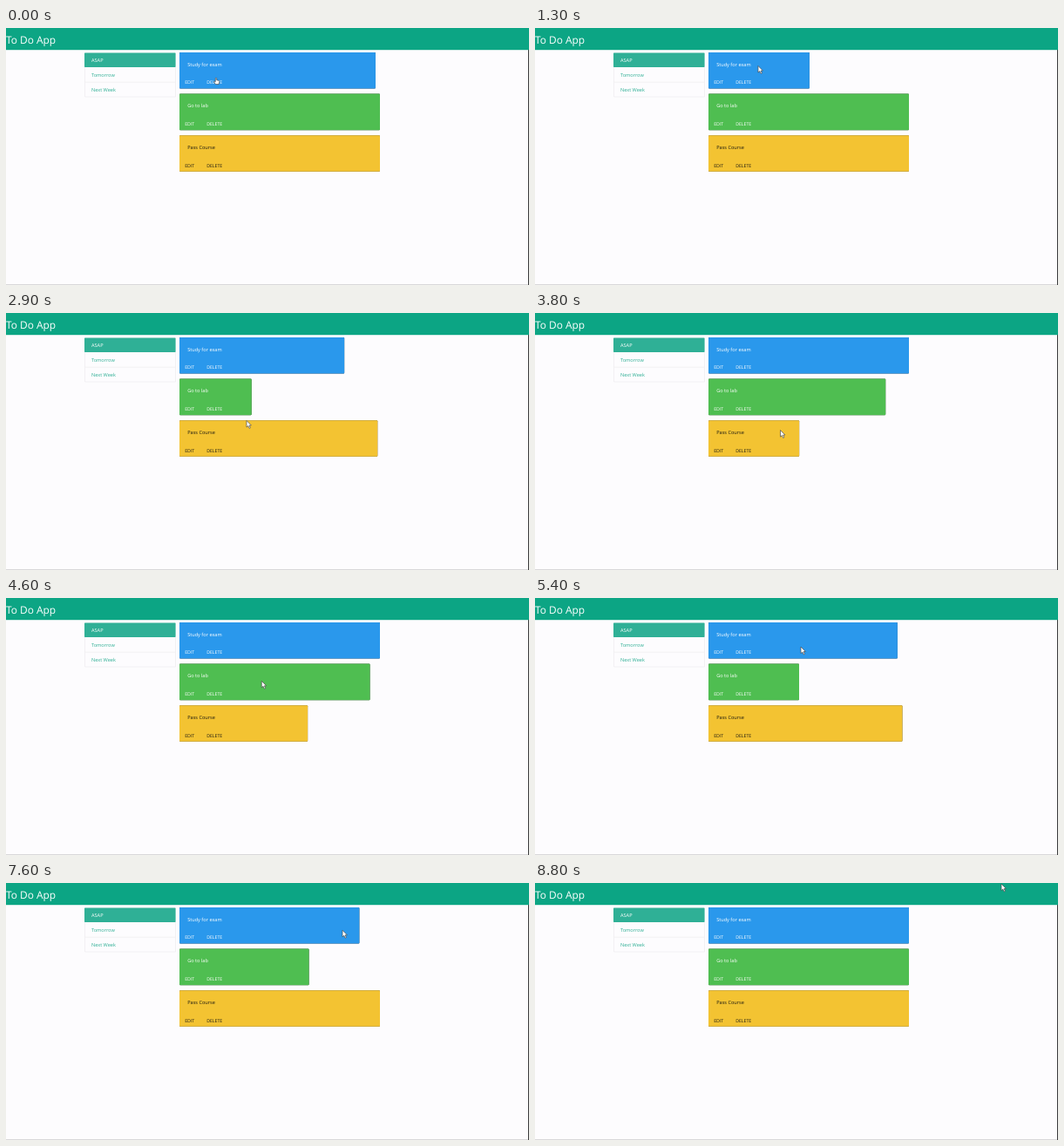
Animation of 600x295 px, one loop 8900 ms. Source, as an HTML page:

```html
<!DOCTYPE html>
<html lang="en">
<head>
<meta charset="utf-8">
<title>To Do App</title>
<style>
  html, body { margin: 0; width: 100%; height: 100%; overflow: hidden; background: #fdfcfe; }
  svg { display: block; width: 600px; height: 295px; }
  text { font-family: "Open Sans", "Noto Sans", sans-serif; font-size: 5.6px; text-rendering: geometricPrecision; }
  .title { font-size: 11.9px; fill: #fff; }
  .action { font-size: 5.2px; }
  .card rect { filter: drop-shadow(0 .3px .7px rgba(0, 0, 0, .75)); }
  .light { fill: #fff; }
  .dark { fill: #1d1a12; }
  .link { fill: #2fb096; }
  .line { fill: none; stroke: #ecebee; stroke-width: .7; }
  .cursor { fill: #fff; stroke: #444; stroke-width: .65; stroke-linejoin: round; }
</style>
</head>
<body>
<svg viewBox="0 0 600 295">
  <path d="M0 294.5H599" stroke="#d9d8da"/>
  <path d="M599.5 25V295" stroke="#3b3b3d"/>
  <rect width="600" height="25.2" fill="#0ca584"/>
  <text class="title" x="0" y="17.6">To Do App</text>

  <path class="line" d="M90.5 45V79H194.5V45M90.5 62.2H194.5"/>
  <rect x="90" y="28.5" width="104.6" height="16.4" rx=".6" fill="#2fb096"/>
  <text class="light" x="98" y="38.8">ASAP</text>
  <text class="link" x="98" y="55.8">Tomorrow</text>
  <text class="link" x="98" y="73">Next Week</text>

  <g id="cards"></g>

  <path id="arrow" class="cursor" d="M0 0V7.6L1.8 6L3.1 8.9L4.4 8.3L3.1 5.5H5.4Z"/>
  <path id="hand" class="cursor" d="M-.7 .5Q0-.5 .7 .5V2.8L3.4 3.5Q4 3.8 3.8 4.6L3.1 7.6H-.6L-2.4 4.9Q-2.4 3.9-1.5 4.2L-.7 4.9Z"/>
</svg>
<script>
const LOOP = 8900, STEP = 100;
const LEFT = 199, FULL = 429, TOP = 28, PITCH = 47.6;

// A hovered card shrinks from `enter` to `leave`, down to the pointer, then regrows until `done`.
const cards = [
  { label: "Study for exam", fill: "#2a98ec", tone: "light", hovers: [
    { enter: -60, leave: 1800, stop: 273, done: 3290 },
    { enter: 5270, leave: 6440, stop: 311, done: 7890 }] },
  { label: "Go to lab", fill: "#4fbe51", tone: "light", hovers: [
    { enter: 1740, leave: 2850, stop: 275, done: 4000 },
    { enter: 4520, leave: 5400, stop: 303, done: 6650 },
    { enter: 6600, leave: 7300, stop: 315, done: 8350 }] },
  { label: "Pass Course", fill: "#f3c332", tone: "dark", hovers: [
    { enter: 2880, leave: 3940, stop: 284, done: 5480 }] }
];

const waypoints = [
  { at: 0, x: 241, y: 57 }, { at: 1300, x: 256, y: 43.5 }, { at: 1850, x: 275, y: 85 },
  { at: 2900, x: 276, y: 123.5 }, { at: 3800, x: 281.5, y: 134.5 }, { at: 5400, x: 305, y: 56 },
  { at: 6600, x: 310.5, y: 87 }, { at: 7300, x: 314, y: 85 }, { at: 8100, x: 506, y: 3 },
  { at: 8800, x: 535, y: 1 }
];

const byId = id => document.getElementById(id);
const mix = (a, b, part) => a + (b - a) * part;
const progress = (from, to, time) => Math.min(1, Math.max(0, (time - from) / (to - from)));

function hoverEdge({ enter, leave, stop, done }, time) {
  return time < leave
    ? mix(FULL, stop, progress(enter, leave, time))
    : mix(stop, FULL, progress(leave, done, time));
}

function pointerAt(time) {
  const i = waypoints.findIndex(point => point.at >= time);
  const to = waypoints[i], from = waypoints[i - 1] || to;
  const part = from === to ? 0 : progress(from.at, to.at, time);
  return [mix(from.x, to.x, part), mix(from.y, to.y, part)];
}

function add(parent, name, attributes, content = "") {
  const node = document.createElementNS("http://www.w3.org/2000/svg", name);
  for (const key in attributes) node.setAttribute(key, attributes[key]);
  node.textContent = content;
  return parent.appendChild(node);
}

cards.forEach((card, i) => {
  const top = TOP + i * PITCH, { label, fill, tone } = card;
  const group = add(byId("cards"), "g", { class: "card" });
  card.rect = add(group, "rect", { x: LEFT, y: top, height: 41.6, rx: 1, fill });
  add(group, "text", { x: 208.2, y: top + 15.8, class: tone }, label);
  add(group, "text", { x: 205.2, y: top + 36.3, class: "action " + tone }, "EDIT");
  add(group, "text", { x: 230.2, y: top + 36.3, class: "action " + tone }, "DELETE");
});

function draw(now) {
  const time = Math.floor((now % LOOP) / STEP) * STEP;
  for (const { rect, hovers } of cards) {
    const edge = Math.min(...hovers.map(hover => hoverEdge(hover, time)));
    rect.setAttribute("width", edge - LEFT);
  }
  const active = time < 300 ? "hand" : "arrow";
  const [x, y] = pointerAt(time);
  for (const id of ["hand", "arrow"]) {
    byId(id).setAttribute("transform", `translate(${x} ${y})`);
    byId(id).style.display = id === active ? "" : "none";
  }
}

const start = performance.now();
function tick() {
  draw(performance.now() - start);
  requestAnimationFrame(tick);
}
tick();
</script>
</body>
</html>
```
